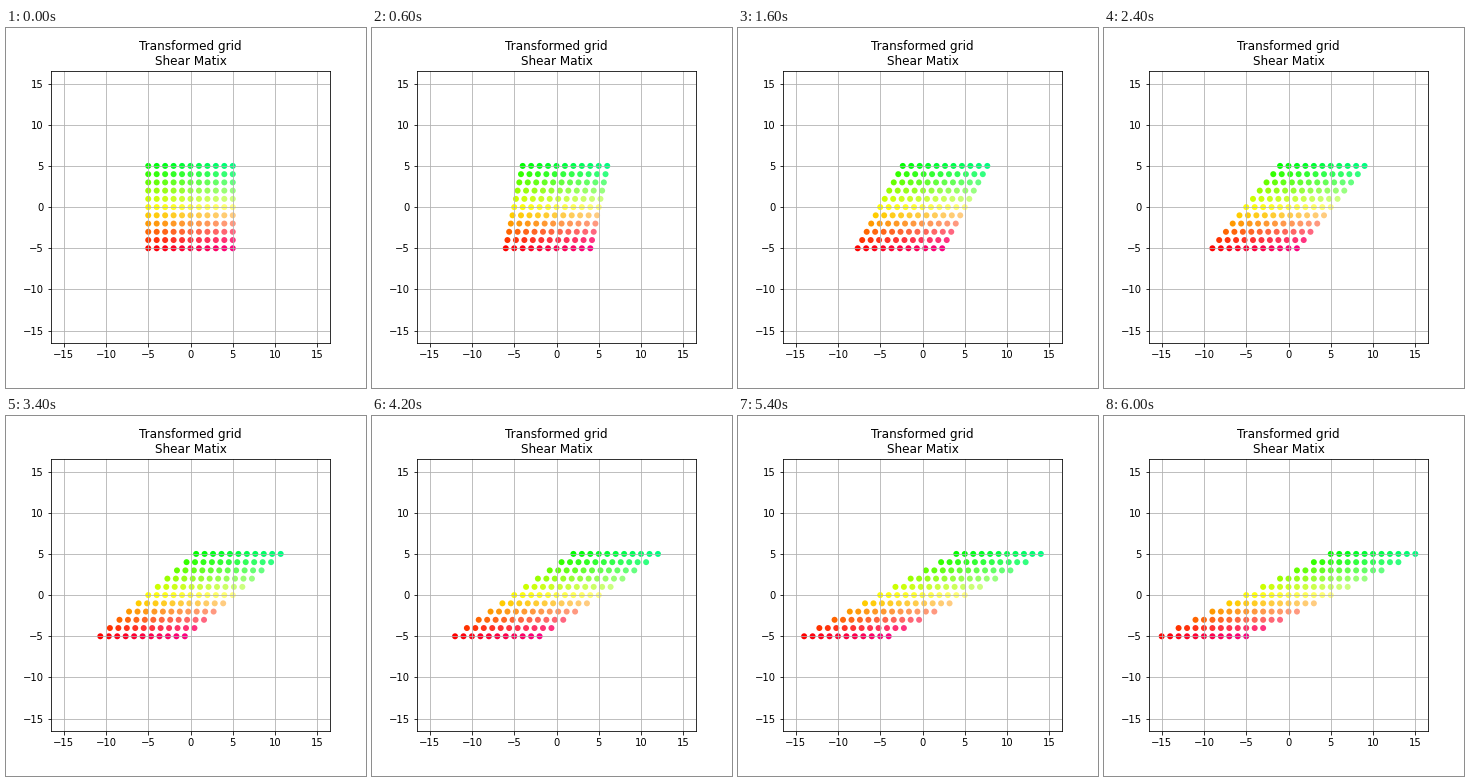
Animation of 360 by 360 pixels, one loop 6.2 s. Source, as a matplotlib script:

```python
import numpy as np
import matplotlib.pyplot as plt
from matplotlib.animation import FuncAnimation

STEPS = 30
MAX_SHEAR = 2
HALF = 5


def point_color(x, y):
    """Red to green along y, more blue towards the right."""
    return min(1, 1 - y / HALF), min(1, 1 + y / HALF), 1 / 4 + x / 20


axis = np.linspace(-HALF, HALF, 2 * HALF + 1)
grid = np.column_stack([np.tile(axis, axis.size), np.repeat(axis, axis.size)])
colors = [point_color(x, y) for x, y in grid]

fig, ax = plt.subplots(figsize=(5, 5), dpi=72)
fig.subplots_adjust(left=0.125, right=0.9, bottom=0.125, top=0.88)
ax.set(xlim=(-16.5, 16.5), ylim=(-16.5, 16.5))
ax.set_title("Transformed grid\nShear Matix")
ax.grid(True)
points = ax.scatter(*grid.T, s=36, c=colors, edgecolor="none")


def update(i):
    shear = np.array([[1, MAX_SHEAR * i / STEPS], [0, 1]])
    points.set_offsets(grid @ shear.T)
    return (points,)


anim = FuncAnimation(fig, update, frames=STEPS + 1, interval=200,
                     repeat=True, repeat_delay=0)
plt.show()
```
